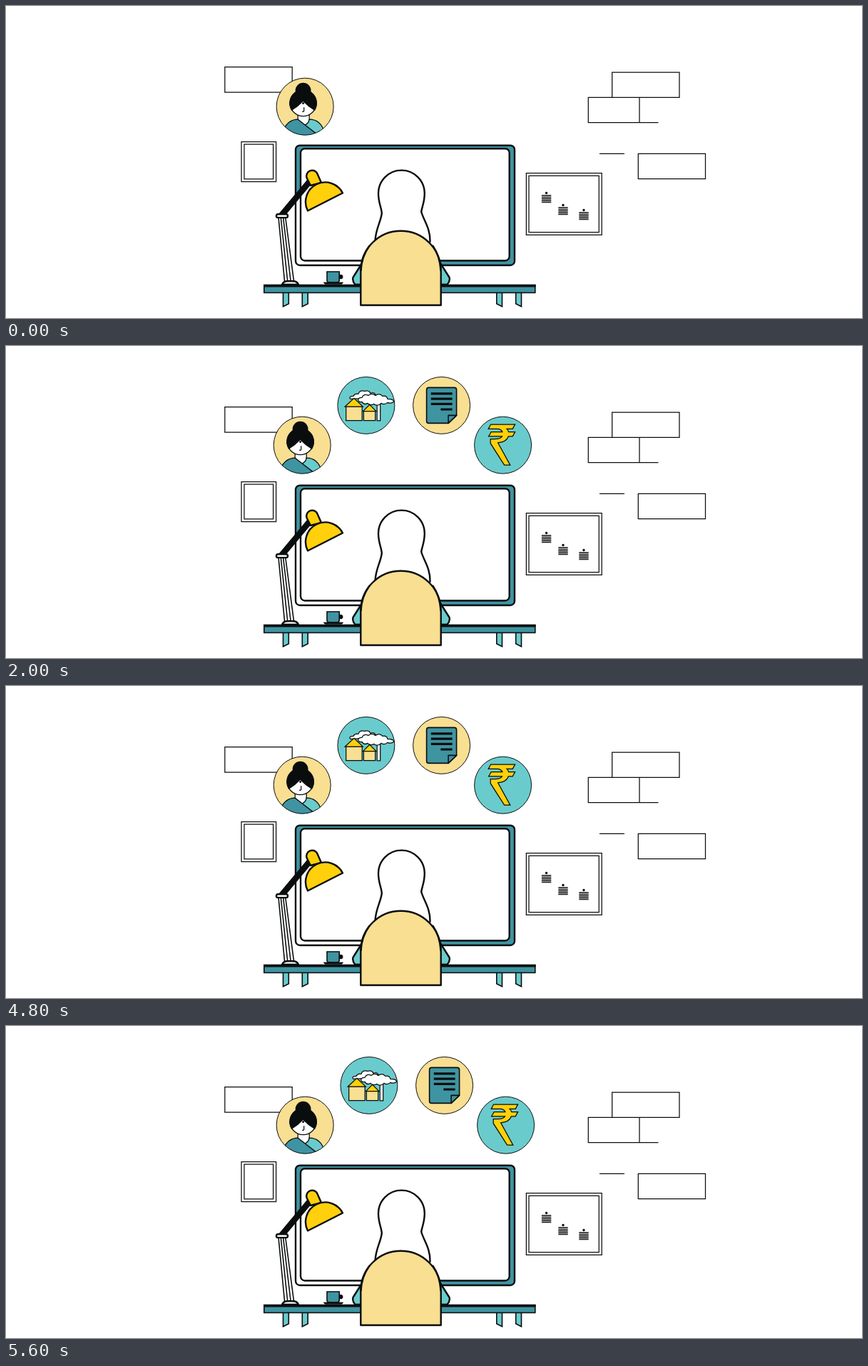
An HTML page for the animation above (7600 ms loop, 1200 by 438 pixels).

```html
<!DOCTYPE html>
<html lang="en">
<head>
<meta charset="utf-8">
<title>Desk with floating ideas</title>
<style>
html, body { margin: 0; width: 100%; height: 100%; overflow: hidden; background: #fff; }
svg { display: block; width: 1200px; height: 438px; }
.ink { stroke: #0a0d0e; fill: #fff; }
.thin { stroke-width: 1.25; }
.mid { stroke-width: 1.6; }
.bold { stroke-width: 2.4; stroke-linejoin: round; }
.teal { fill: #3f94a2; }
.aqua { fill: #6acbcc; }
.cream { fill: #f8df92; }
.sun { fill: #ffd00b; }
.black { fill: #0a0d0e; }
.none { fill: none; }
</style>
</head>
<body>
<svg viewBox="0 0 1200 438">
  <defs>
    <clipPath id="disc"><circle r="40"/></clipPath>
    <g id="note">
      <circle class="black" cy="-.5" r="1.7"/>
      <path class="ink" stroke-width="1.5" d="M-6.7 3H6.7M-6.7 5.4H6.7M-6.7 7.8H6.7M-6.7 10.2H6.7M-6.7 12.4H6.7"/>
    </g>
  </defs>

  <!-- wall -->
  <g class="ink thin">
    <path d="M306.8 85.7H401.2V121.2H306.8ZM849.7 93H944V128.3H849.7ZM816.3 128.3H888V163.5H816.3ZM888 163.5H914.5M832 207.3H867M886.3 207.3H980.5V242.5H886.3Z"/>
    <path d="M330 190.6H378.6V246.5H330ZM333.9 194.2H374.6V242.8H333.9Z"/>
    <path d="M729.4 234.6H835.2V321.3H729.4ZM733 238.4H831.3V317.5H733Z"/>
  </g>
  <use href="#note" x="757.6" y="263"/>
  <use href="#note" x="781" y="280"/>
  <use href="#note" x="810" y="287"/>

  <!-- monitor -->
  <rect class="teal" x="406" y="195.7" width="307" height="168.3" rx="6"/>
  <path fill="#fff" d="M406 262H420V350H500V364H412Q406 364 406 358Z"/>
  <rect class="ink bold none" x="406" y="195.7" width="307" height="168.3" rx="6"/>
  <rect class="ink bold" stroke-width="2" x="413" y="200.2" width="292.7" height="157.3" rx="6"/>

  <!-- desk -->
  <g class="ink mid aqua">
    <path d="M388.5 402H396.3V418L388.5 422ZM415.3 402H423.2V418L415.3 422ZM695.5 402H687.8V418L695.5 422ZM722.5 402H714.7V418L722.5 422Z"/>
  </g>
  <rect class="ink mid teal" x="361.8" y="392" width="380" height="10.5"/>
  <rect class="black" x="361" y="390.8" width="381.6" height="3.8"/>

  <!-- cup -->
  <circle class="black" cx="469.3" cy="380.2" r="3.1"/>
  <path class="ink mid teal" d="M450 373H467.2V385Q467.2 388 464 388H453Q450 388 450 385Z"/>
  <path class="black" d="M444.8 387.7H473Q472 390.8 469 390.8H449Q446 390.8 444.8 387.7Z"/>

  <!-- lamp -->
  <g class="ink">
    <path class="mid" d="M382 297L390.6 387H403.6L391.8 297Z"/>
    <path class="mid none" d="M385.3 297L394.8 387M388.6 297L399.2 387"/>
    <path class="bold" stroke-width="2" d="M387 391Q389 386.3 395 386.3H402Q408 386.3 410 391Z"/>
    <path class="none" stroke-width="8.5" d="M386 294L426 246"/>
    <rect class="bold" x="379" y="292.3" width="16" height="4.8" rx="2.4"/>
    <path class="bold sun" d="M427 252L421.7 241.5A8 8 0 0 1 436 234.5L442 248Z"/>
    <path class="bold sun" d="M423 287.5A27.5 27.5 0 0 1 472 262.5Z"/>
  </g>

  <!-- person and chair -->
  <g class="ink bold">
    <path class="aqua" d="M501 358L486.5 381Q485 386 489.5 391H501ZM607 358L621.5 381Q623 386 618.5 391H607Z"/>
    <path d="M517.5 330C518 313 525.5 303 526.8 291C526.5 283 522 277 522 263A32.4 32.4 0 0 1 586.8 263C586.8 276 583 282 582.2 289C586 302 594.5 311 594.5 330L590 350H522Z"/>
    <path class="cream" d="M497.3 420V372A56.2 56.2 0 0 1 609.7 372V420Z"/>
    <path class="none" d="M497.5 372Q498.5 351 510 336M609.5 372Q608.5 351 598 336"/>
  </g>

  <!-- bubbles -->
  <g id="bubbles">
    <g transform="translate(419.2 141.2)">
      <circle class="cream" r="40"/>
      <g class="ink thin" clip-path="url(#disc)">
        <path d="M-10 9V21L-1 30L6 21V9Z"/>
        <path class="aqua" d="M6 18Q22 18 27 36V45H-3V27Q5 25 6 18Z"/>
        <path class="teal" d="M-30 45V32Q-23 18 -10 18L17 39L12 45Z"/>
        <circle cx="-2.6" cy="-5" r="18.5"/>
        <circle class="black" cx="-2.6" cy="-22.5" r="10.3"/>
        <path class="black" d="M-18.7 5A18.8 18.8 0 1 1 13.5 5Q5 0 -2.6 -8Q-10 0 -18.7 5Z"/>
        <circle class="black" stroke="none" cx="-2.6" cy="-4.8" r="1.5"/>
        <path class="none" d="M-1.5 1V5.5Q-1.5 7.6 -4 7"/>
      </g>
      <circle class="ink none" r="40"/>
    </g>

    <g data-from="500" transform="translate(508.9 85.4)">
      <circle class="aqua" r="40"/>
      <g class="ink thin">
        <path d="M-22 -9Q-25 -13 -18 -13Q-16 -17 -11 -16Q-9 -22 -2 -20Q4 -22 6 -17Q11 -19 13 -15Q18 -15 17 -11Z"/>
        <path d="M15.3 -4H19.8V21.5H15.3Z"/>
        <path d="M-11 -7Q-12 -11 -6 -11Q-3 -17 3 -14Q8 -18 13 -14Q19 -18 23 -13Q29 -14 30 -9Q39 -9 38.5 -5Q34 -2 30 -4Q26 0 21 -3Q16 2 11 -2Q6 1 2 -3Q-3 0 -6 -5Q-10 -4 -11 -7Z"/>
        <path class="cream" d="M-28.2 1.5H-5.7V21.3H-28.2ZM-3.5 8H12.8V21.3H-3.5Z"/>
        <path class="sun" d="M-29.6 1.6L-17 -10L-4.6 1.6ZM-4.6 8.2L4.8 -1L14 8.2Z"/>
      </g>
      <circle class="ink none" r="40"/>
    </g>

    <g data-from="1000" transform="translate(614.6 85.4)">
      <circle class="cream" r="40"/>
      <path class="ink mid teal" d="M-18 -25H18Q21 -25 21 -22V14L9.5 25H-18Q-21 25 -21 22V-22Q-21 -25 -18 -25Z"/>
      <path class="ink mid teal" stroke-linejoin="round" d="M21 14H9.5V25Z"/>
      <path class="ink none" stroke-width="3.2" d="M-14.8 -16.6H15M-14.8 -9.3H15M-14.8 -2H15M-1.2 5.6H15"/>
      <circle class="ink none" r="40"/>
    </g>

    <g data-from="1500" transform="translate(700.6 141.2)">
      <circle class="aqua" r="40"/>
      <path class="ink thin sun" d="M-17 -29.2H17L13.6 -22.8H5.5Q7.5 -21 8 -18.6H17L13.6 -12.4H7.8Q5 -4.3 -7 -3.3L10.2 28H2L-17.4 -2.5V-8.5H-12Q-3 -8.5 -1 -12.4H-20L-16.4 -18.6H-.8Q-2.5 -22.8 -8 -22.8H-20.4Z"/>
      <circle class="ink none" r="40"/>
    </g>
  </g>
</svg>
<script>
const LOOP = 7600, SWAY_START = 2000, SWAY = 2800, STEP = 200;
const poses = [[-4, -2], [-1, -6], [2, -4], [6, -2], [0, -2]];
const bubbles = document.getElementById('bubbles');
const late = [...bubbles.querySelectorAll('[data-from]')];

function poseAt(t) {
  if (t < SWAY_START) return [0, 0];
  const step = Math.floor((t - SWAY_START) % SWAY / STEP);
  return poses[Math.min(step, poses.length - 1)];
}

function draw() {
  const t = performance.now() % LOOP;
  bubbles.setAttribute('transform', `translate(${poseAt(t)})`);
  for (const b of late) b.style.display = t < +b.dataset.from ? 'none' : '';
  requestAnimationFrame(draw);
}
draw();
</script>
</body>
</html>
```
